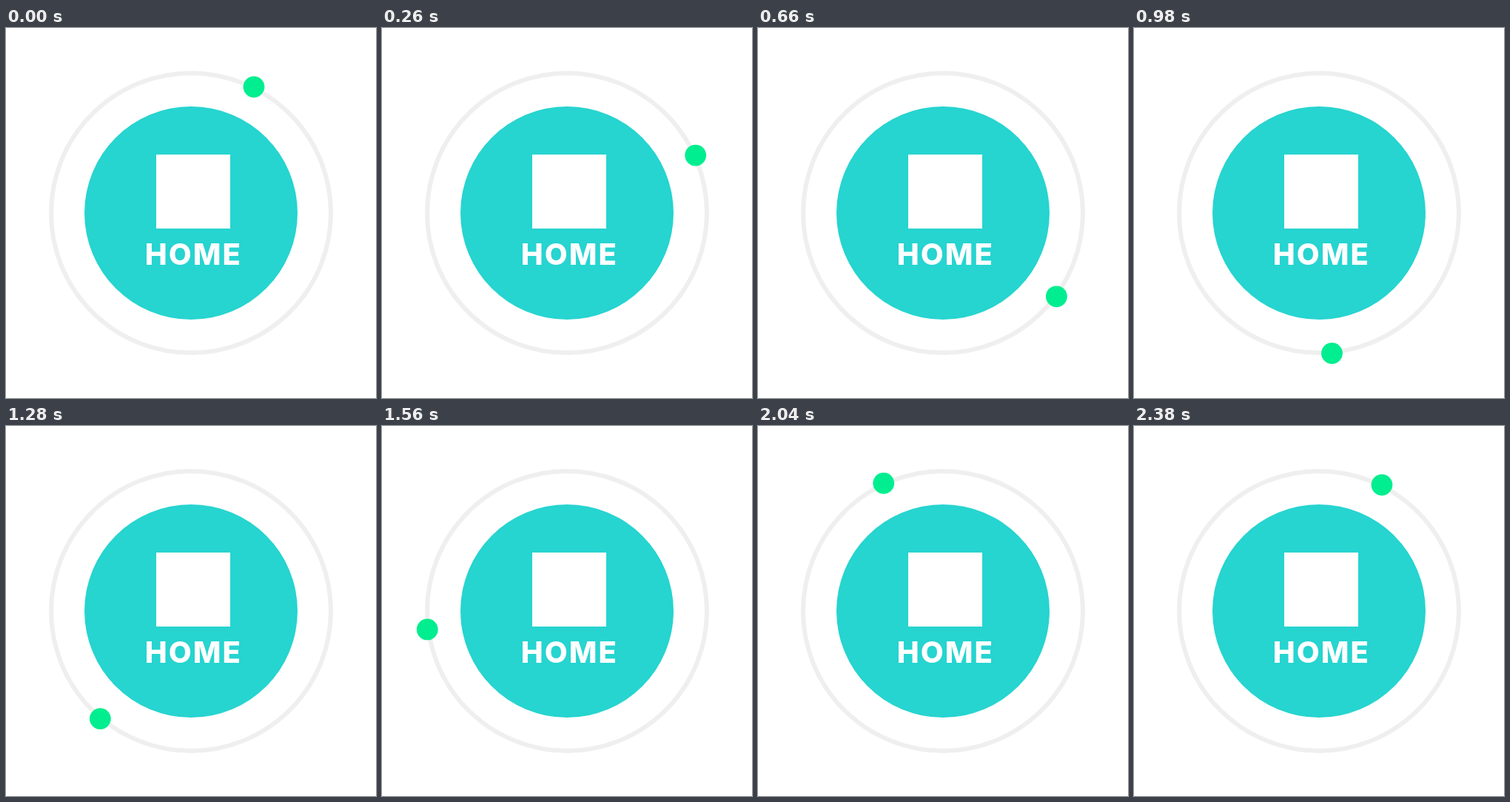
An HTML page that plays this animation: 500x500 px, repeating every 2400 ms.

```html
<!DOCTYPE html>
<html lang="en">
<head>
<meta charset="utf-8">
<title>Loader</title>
<style>
  html, body { margin: 0; width: 100%; height: 100%; overflow: hidden; background: #fff; }
  svg { display: block; width: 100%; height: 100%; }
  text { font: 800 40px Inter, sans-serif; letter-spacing: 2px; text-anchor: middle; }
</style>
</head>
<body>
<svg viewBox="0 0 500 500">
  <circle cx="250" cy="250" r="189" fill="none" stroke="#efefef" stroke-width="6"/>
  <circle cx="250" cy="250" r="144" fill="#26d4d0"/>
  <g fill="#fff">
    <rect x="203" y="171" width="100" height="100"/>
    <text x="253.3" y="320">HOME</text>
  </g>
  <circle id="dot" r="14.4" fill="#00ee8f"/>
</svg>
<script>
  const LOOP = 2400, STEP = 20, ORBIT = 190.4, START = 26.5;
  const dot = document.getElementById("dot");

  // The first and last steps share one position, so a full turn takes LOOP - STEP.
  function draw() {
    const time = Math.floor(performance.now() % LOOP / STEP) * STEP;
    const angle = (START + 360 * time / (LOOP - STEP)) * Math.PI / 180;
    dot.setAttribute("cx", 250 + ORBIT * Math.sin(angle));
    dot.setAttribute("cy", 250 - ORBIT * Math.cos(angle));
    requestAnimationFrame(draw);
  }
  draw();
</script>
</body>
</html>
```
